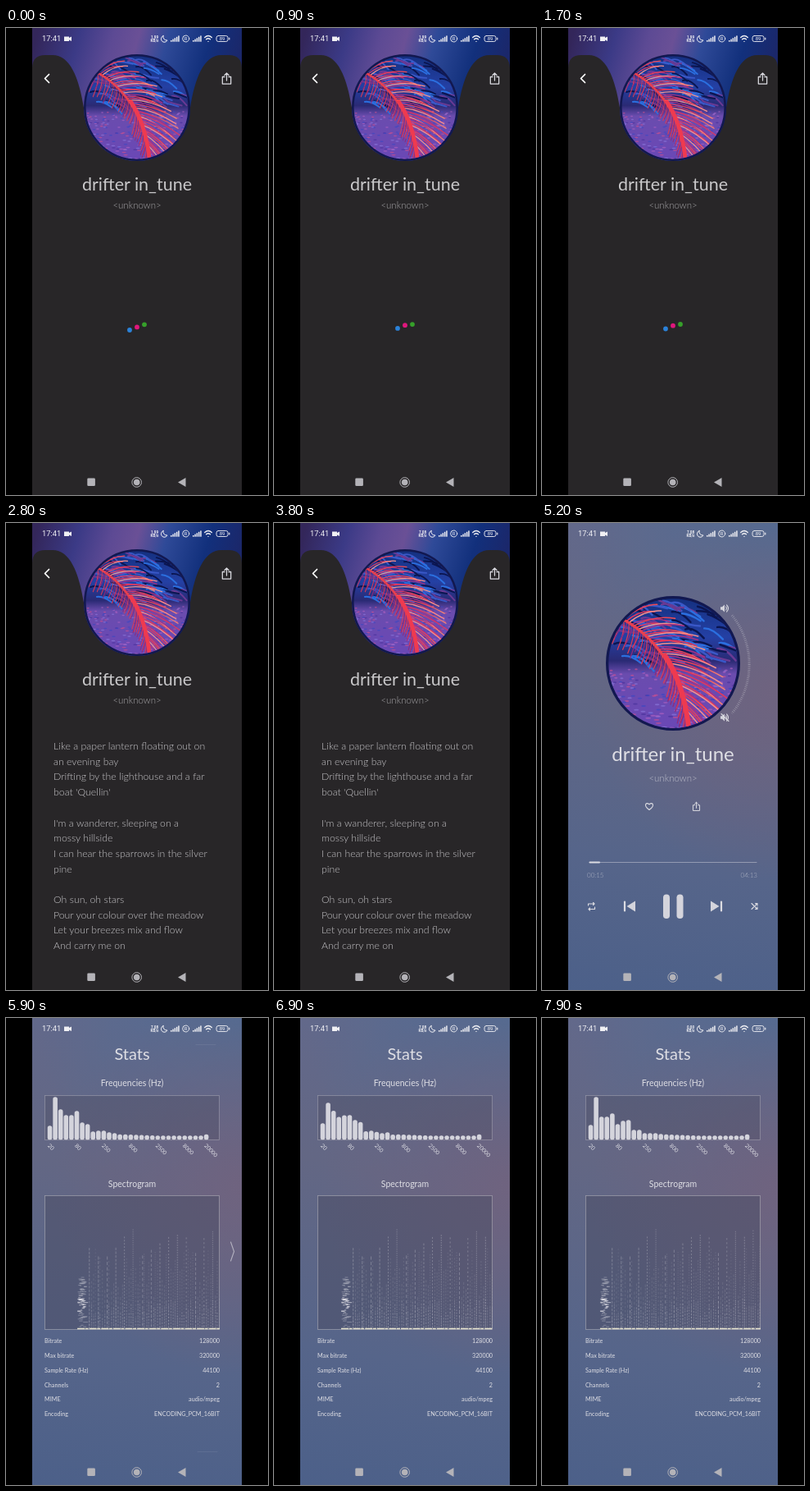
An HTML page that plays this animation: 320x569 px, repeating every 8 s.

```html
<!DOCTYPE html>
<html lang="en">
<head>
<meta charset="utf-8">
<title>Music player</title>
<style>
html, body { margin: 0; width: 100%; height: 100%; overflow: hidden; background: #000; }
#phone {
  position: absolute; left: 32px; top: 0; width: 256px; height: 569px; overflow: hidden;
  background:
    radial-gradient(circle at 100% 36%, #6f637f 0, #6f637f00 52%),
    radial-gradient(circle at 100% 0, #526b92 0, #526b9200 40%),
    linear-gradient(190deg, #62698c 0, #636784 35%, #56658a 72%, #4c6089 100%);
}
.layer { position: absolute; left: 0; top: 0; width: 256px; height: 569px; overflow: hidden; }
text { font-family: Lato, "Open Sans", sans-serif; fill: #dedee4; }
.light { font-weight: 300; }
.mid { text-anchor: middle; }
.end { text-anchor: end; }
.line { fill: none; stroke: #dcdce2; stroke-width: 1.1; stroke-linecap: round; stroke-linejoin: round; }
.fill { fill: #d4d4dc; }
#status text { font-family: Roboto, sans-serif; fill: #f0f0f4; }
#status .line { stroke: #f0f0f4; }
#lyrics text { font-size: 12.3px; fill: #c6c5c8; }

#sheet, #player, #stats, #scrim, #lyrics, #dots, #pressed, #hint, #spectrum {
  animation: 8s linear infinite;
}
#sheet { animation-name: sheet; }
#player { animation-name: player; }
#stats { animation-name: stats; }
#scrim { animation-name: scrim; background: #000; }
#lyrics { animation-name: lyrics; }
#dots { animation-name: dots; }
#pressed { animation-name: pressed; }
#hint { animation-name: hint; }
#spectrum { animation-name: spectrum; }
@keyframes sheet {
  0%, 48.2% { transform: none; border-radius: 0; }
  48.8% { border-radius: 20px; }
  53.75% { transform: translateX(206px); }
  57.5% { transform: translateX(212px); animation-timing-function: ease-out; }
  59.9%, 100% { transform: translateX(256px); border-radius: 20px; }
}
@keyframes player {
  0%, 48.2% { transform: translateX(-64px); }
  53.75% { transform: translateX(-13px); }
  57.5% { transform: translateX(-11px); animation-timing-function: ease-out; }
  59.9%, 70.2% { transform: none; }
  73.75% { transform: translateX(250px); animation-timing-function: ease-out; }
  79%, 100% { transform: translateX(256px); }
}
@keyframes stats {
  0%, 70.2% { transform: translateX(-256px); }
  73.75% { transform: translateX(-6px); animation-timing-function: ease-out; }
  79%, 100% { transform: none; }
}
@keyframes scrim {
  0%, 48.2% { opacity: .45; }
  53.75%, 57.5% { opacity: .09; }
  59.9%, 100% { opacity: 0; }
}
@keyframes lyrics { 0%, 25% { opacity: 0; } 29.5%, 100% { opacity: 1; } }
@keyframes dots { 0%, 24% { opacity: 1; } 27%, 100% { opacity: 0; } }
@keyframes pressed { 0%, 48.2% { opacity: 0; } 50%, 100% { opacity: 1; } }
@keyframes hint { 0%, 70.5% { opacity: 0; } 72%, 75% { opacity: .65; } 82%, 100% { opacity: 0; } }
@keyframes spectrum { from { transform: translateX(105.4px); } to { transform: translateX(16.8px); } }
</style>
</head>
<body>
<div id="phone">
  <svg id="player" class="layer" viewBox="32 0 256 569">
    <defs>
      <linearGradient id="scene" x2="0" y2="1">
        <stop offset="0" stop-color="#143080"/><stop offset=".3" stop-color="#2440a4"/>
        <stop offset=".48" stop-color="#2a2a74"/><stop offset=".58" stop-color="#6a4cae"/>
        <stop offset="1" stop-color="#6a48b6"/>
      </linearGradient>
      <linearGradient id="leaf" x2="1" y2="1">
        <stop offset="0" stop-color="#d8306a"/><stop offset=".5" stop-color="#f04a50"/>
        <stop offset="1" stop-color="#f58a78"/>
      </linearGradient>
      <clipPath id="round"><circle r="97"/></clipPath>
      <symbol id="palm" viewBox="-101 -101 202 202" overflow="visible"></symbol>
      <path id="share" class="line" d="M-2.200-2H-4.500V5.500H4.500V-2H2.200M0 2V-5.800M-2.200-3.700L0-5.900L2.200-3.700"/>
      <g id="speaker">
        <path class="fill" d="M-5-1.700H-3L0-4.500V4.500L-3 1.700H-5Z"/>
        <path class="line" d="M1.700-2Q3.200 0 1.700 2M2.600-4.200Q6.400 0 2.600 4.200"/>
      </g>
      <g id="skip">
        <path class="fill" d="M-7-6.500V6.500L3.500 0Z"/>
        <path class="line" style="stroke-width:2.200" d="M6-5.500V5.500"/>
      </g>
    </defs>
    <use href="#palm" x="78" y="89" width="164" height="164"/>
    <path class="line" opacity=".4" style="stroke-width:3;stroke-linecap:butt;stroke-dasharray:.8 1.500" d="M232 112.500A95 95 0 0 1 232 232"/>
    <use href="#speaker" x="223" y="104"/>
    <use href="#speaker" x="223" y="237"/>
    <path class="line" d="M219 232.500L228 241.500"/>
    <text class="mid" x="160" y="290" font-size="24">drifter in_tune</text>
    <text class="mid light" x="160" y="315" font-size="11.500" opacity=".7">&lt;unknown&gt;</text>
    <path class="line" d="M131 349.500C123 343.500 127.500 339.500 131 342.800C134.500 339.500 139 343.500 131 349.500Z"/>
    <use href="#share" transform="translate(188.500 345.500) scale(.9)"/>
    <path class="line" opacity=".45" d="M58 413.500H262"/>
    <path class="line" style="stroke-width:2" d="M58.500 413.500H70"/>
    <g class="light" opacity=".65" font-size="8">
      <text id="elapsed" x="55" y="432">00:14</text>
      <text class="end" x="263" y="432">04:13</text>
    </g>
    <path class="line" d="M56.500 466V464H64M62.500 462.500L64 464L62.500 465.500M64.500 468V470.500H57M58.500 469L57 470.500L58.500 472"/>
    <use href="#skip" transform="translate(107 467) scale(-1 1)"/>
    <use href="#skip" transform="translate(213 467)"/>
    <rect class="fill" x="148" y="452.500" width="8" height="29.500" rx="3.800"/>
    <rect class="fill" x="164.500" y="452.500" width="8" height="29.500" rx="3.800"/>
    <path class="line" d="M256 463.500L263 470.500M256 470.500L258.500 468M260.500 466L263 463.500M260.500 463.500H263V466M260.500 470.500H263V468"/>
  </svg>

  <svg id="stats" class="layer" viewBox="32 0 256 569">
    <text class="mid" x="160" y="51" font-size="20">Stats</text>
    <text class="mid" x="160" y="83" font-size="10.500">Frequencies (Hz)</text>
    <rect x="53.500" y="94.500" width="213" height="54" fill="#4c4a60" fill-opacity=".35" stroke="#bdbbc6" stroke-opacity=".5" stroke-width=".8"/>
    <g id="bars"></g>
    <g id="scale" font-size="6.800"></g>
    <text class="mid" x="160" y="206" font-size="10.500">Spectrogram</text>
    <rect x="53.500" y="216.500" width="213" height="163" fill="#4a4c64" fill-opacity=".5" stroke="#c2c0c4" stroke-opacity=".6" stroke-width=".8"/>
    <svg x="53" y="216" width="214" height="164" overflow="hidden"><g id="spectrum"></g></svg>
    <g id="facts" font-size="7.200"></g>
  </svg>
  <svg class="layer" viewBox="32 0 256 569">
    <g id="hint">
      <path class="line" d="M274.500 273L278.500 284.500L274.500 296"/>
      <path class="line" opacity=".15" d="M232 32.500H256M234 528.500H258"/>
    </g>
  </svg>
  <div id="scrim" class="layer"></div>

  <div id="sheet" class="layer">
    <svg class="layer" viewBox="32 0 256 569">
      <defs>
        <linearGradient id="blur" gradientUnits="userSpaceOnUse" x1="40" y1="0" x2="280" y2="70">
          <stop offset="0" stop-color="#33265a"/><stop offset=".2" stop-color="#3b3a86"/>
          <stop offset=".36" stop-color="#5d4a94"/><stop offset=".48" stop-color="#6a5096"/>
          <stop offset=".62" stop-color="#2f4a98"/><stop offset=".82" stop-color="#12307c"/>
          <stop offset="1" stop-color="#1c2668"/>
        </linearGradient>
      </defs>
      <rect x="32" width="256" height="180" fill="url(#blur)"/>
      <path fill="#282628" d="M32 49Q32 33 48 33H57C78 33 89 60 95 97A65 65 0 0 0 225 97C231 60 242 33 263 33H272Q288 33 288 49V569H32Z"/>
      <use href="#palm" x="95" y="32" width="130" height="130"/>
      <circle id="pressed" cx="50" cy="61.500" r="13" fill="#4a494c"/>
      <path class="line" style="stroke:#fff;stroke-width:1.700" d="M52.500 56.500L47.500 61.500L52.500 66.500"/>
      <use href="#share" transform="translate(269.500 61.800) scale(1.150)"/>
      <text class="mid" x="160" y="198" font-size="21.500" style="fill:#c9c8ca">drifter in_tune</text>
      <text class="mid light" x="160" y="220" font-size="11.500" style="fill:#a5a4a7">&lt;unknown&gt;</text>
      <g id="dots">
        <circle cx="151" r="2.900" fill="#2b82d9"/>
        <circle cx="160" r="2.900" fill="#e0177d"/>
        <circle cx="169" r="2.900" fill="#36a02a"/>
      </g>
      <g id="lyrics" class="light"></g>
    </svg>
  </div>

  <svg id="status" class="layer" viewBox="32 0 256 569">
    <text x="44" y="16.300" font-size="9.300">17:41</text>
    <path fill="#f0f0f4" d="M71 10.500H77V12L80 10.500V16L77 14.500V16H71Z"/>
    <g class="mid" font-size="4.600" font-weight="700">
      <text id="speed" x="181.500" y="12.500">1.99</text><text x="181.500" y="17">KB/s</text>
    </g>
    <path class="line" style="stroke-width:1" d="M192 9.500A4 4 0 1 0 197 15A4.500 4.500 0 0 1 192 9.500Z"/>
    <g id="signal"></g>
    <circle class="line" style="stroke-width:.9" cx="219.700" cy="13" r="4"/>
    <text class="mid" x="219.700" y="15.300" font-size="6">R</text>
    <path class="line" style="stroke-width:1.300" d="M242.700 11.500Q247 7.500 251.300 11.500M244.500 13.800Q247 11.600 249.500 13.800M247 16.300V16.400"/>
    <rect class="line" style="stroke-width:.9" x="257" y="9.500" width="14" height="7" rx="2.300"/>
    <path class="line" d="M272.800 12V14"/>
    <text class="mid" x="264" y="15.200" font-size="6">89</text>
    <g fill="#b4b3b8">
      <rect x="99.300" y="548.500" width="9.600" height="9.600" rx="1.300"/>
      <circle cx="159.700" cy="553.500" r="3.800"/>
      <circle cx="159.700" cy="553.500" r="5.800" fill="none" stroke="#b4b3b8" stroke-width="1"/>
      <path d="M210 553.500L219.500 548V559Z"/>
    </g>
  </svg>
</div>
<script>
const $ = id => document.getElementById(id);
const fill = (id, items, make) => { $(id).innerHTML = items.map(make).join(''); };
const range = n => [...Array(n).keys()];
const random = seed => { const s = Math.sin(seed * 127.1 + 11.7) * 43758.5453; return s - Math.floor(s); };
const between = (seed, a, b) => a + (b - a) * random(seed);
const quadratic = (a, b, c) => u => a * (1 - u) ** 2 + 2 * b * u * (1 - u) + c * u * u;

function palm() {
  const stemX = quadratic(-90, 10, 22), stemY = quadratic(-74, -27, 98);
  const speck = i => {
    const y = between(i, 6, 98), x = between(i + 400, -98, 98);
    const color = ['#b062c0', '#3a48c4', '#d0508e', '#8a78dc', '#47309a'][i % 5];
    return `<ellipse cx="${x}" cy="${y}" rx="${2 + y / 40}" ry="1.2" fill="${color}" opacity=".65"/>`;
  };
  const shade = i => {
    const x = between(i + 70, -95, 85), y = between(i + 170, -95, -8);
    const color = ['#2b6fe0', '#0b1550', '#3a58c8', '#6a3a94'][i % 4];
    return `<path d="M${x} ${y}q12 ${between(i, -6, 6)} 28 ${between(i + 9, 2, 20)}" stroke="${color}" stroke-width="3"/>`;
  };
  const leaflet = i => {
    const u = i / 48, x = stemX(u), y = stemY(u);
    const long = (34 + 46 * Math.sin(u * 3.1)) * between(i, .8, 1.1);
    const dy = -34 + 105 * u + between(i + 50, -7, 7);
    const tint = ['url(#leaf)', '#e2385c', '#f5908c', '#a83084'][i % 4];
    const fall = 24 + 22 * random(i + 20);
    return `<path d="M${x} ${y}q${long * .5} ${dy * .5 - 7} ${long} ${dy + 8}" stroke="${tint}" stroke-width="1.9"/>` +
      `<path d="M${x} ${y}q2 ${fall * .4} ${-10 + 6 * u} ${fall}" stroke="${i % 2 ? '#8c2a7c' : '#d83a56'}" stroke-width="1.6"/>`;
  };
  return `<circle r="99" fill="url(#scene)" stroke="#121850" stroke-width="4"/>
    <g clip-path="url(#round)" fill="none" stroke-linecap="round">
    ${range(260).map(speck).join('')}${range(90).map(shade).join('')}
    ${range(43).map(i => leaflet(i + 1)).join('')}
    <path d="M-90-74Q10-27 22 98" stroke="#e8404e" stroke-width="4"/>
    <path d="M-12-12Q16 28 24 98" stroke="#ee3a50" stroke-width="7"/></g>`;
}
$('palm').innerHTML = palm();

const verses = `Like a paper lantern floating out on
an evening bay
Drifting by the lighthouse and a far
boat 'Quellin'

I'm a wanderer, sleeping on a
mossy hillside
I can hear the sparrows in the silver
pine

Oh sun, oh stars
Pour your colour over the meadow
Let your breezes mix and flow
And carry me on`.split('\n');
fill('lyrics', verses, (line, i) => `<text x="58" y="${276 + i * 18.7}">${line}</text>`);

const barX = i => 59.5 + i * 6.59;
fill('bars', range(30), i => `<rect class="fill" x="${barX(i) - 2.8}" width="5.6" rx="2.6"/>`);
fill('scale', [20, 80, 250, 800, 2500, 8000, 20000], (hz, i) =>
  `<text transform="translate(${barX(Math.min(i * 5, 29)) - 3} 156) rotate(45)">${hz}</text>`);

const facts = [['Bitrate', 128000], ['Max bitrate', 320000], ['Sample Rate (Hz)', 44100],
  ['Channels', 2], ['MIME', 'audio/mpeg'], ['Encoding', 'ENCODING_PCM_16BIT']];
fill('facts', facts, ([name, value], i) => {
  const y = 396.3 + i * 17.75;
  return `<text x="53" y="${y}">${name}</text><text class="end" x="267" y="${y}">${value}</text>`;
});

const streak = i => {
  const x = 14 + i * 2.7 + random(i), strong = i % 4 === 0;
  const top = strong ? between(i, 38, 75) : between(i, 60, 125);
  return `<path d="M${x} ${top}V162" stroke-opacity="${strong ? .3 : .14}" stroke-dasharray="${between(i, 1, 4)} ${between(i + 5, 1, 3)}"/>
    <path d="M${x} ${between(i + 8, 125, 150)}V162" stroke-opacity=".22" stroke-dasharray="2 1.5"/>`;
};
const dash = i => {
  const y = between(i + 30, 98, 161), x = between(i + 60, 0, 8);
  return `<path d="M${x} ${y}h${between(i, 2, 6)}" stroke-opacity="${y > 122 && y < 142 ? .75 : .35}"/>`;
};
$('spectrum').innerHTML = `<g fill="none" stroke="#ecebef" stroke-width=".9">
  ${range(70).map(dash).join('')}${range(72).map(streak).join('')}
  <path d="M0 162.600H220" stroke="#e6e4cf" stroke-width="1.500" stroke-dasharray="9 .6 4 1"/></g>`;

fill('signal', [201, 228], x => range(5).map(i =>
  `<rect x="${x + i * 2.3}" y="${15 - i * 1.4}" width="1.500" height="${1.7 + i * 1.4}" fill="#f0f0f4"/>`).join(''));

const early = [17, 52, 37, 30, 30, 35, 21, 19, 10, 11, 11, 9, 8, 6.5];
const late = [18, 52, 28, 28, 32, 19, 23, 24, 12, 12, 8, 8, 8, 7];
const bars = [...$('bars').children], dots = [...$('dots').children];

function barHeight(i, t) {
  if (i >= early.length) return i === 29 ? 6.5 : Math.max(5, 6.8 - (i - 13) * .25);
  const u = Math.min(1, Math.max(0, (t - 5900) / 2000));
  const sway = Math.sin(u * Math.PI) * between(i + Math.floor(t / 100) * 17, -.18, .15);
  return Math.min(52.5, (early[i] + (late[i] - early[i]) * u) * (1 + sway));
}

function frame(now) {
  const t = now % 8000;
  dots.forEach((dot, i) => {
    dot.setAttribute('cy', 365 + 4 * Math.cos(2 * Math.PI * t / 820 + .72 + i));
  });
  bars.forEach((bar, i) => {
    const h = barHeight(i, t);
    bar.setAttribute('y', 148.3 - h);
    bar.setAttribute('height', h);
  });
  $('elapsed').textContent = t < 5200 ? '00:14' : '00:15';
  $('speed').textContent = t < 3400 ? '1.99' : t < 7400 ? '7.08' : '0.00';
  requestAnimationFrame(frame);
}
requestAnimationFrame(frame);
</script>
</body>
</html>
```
